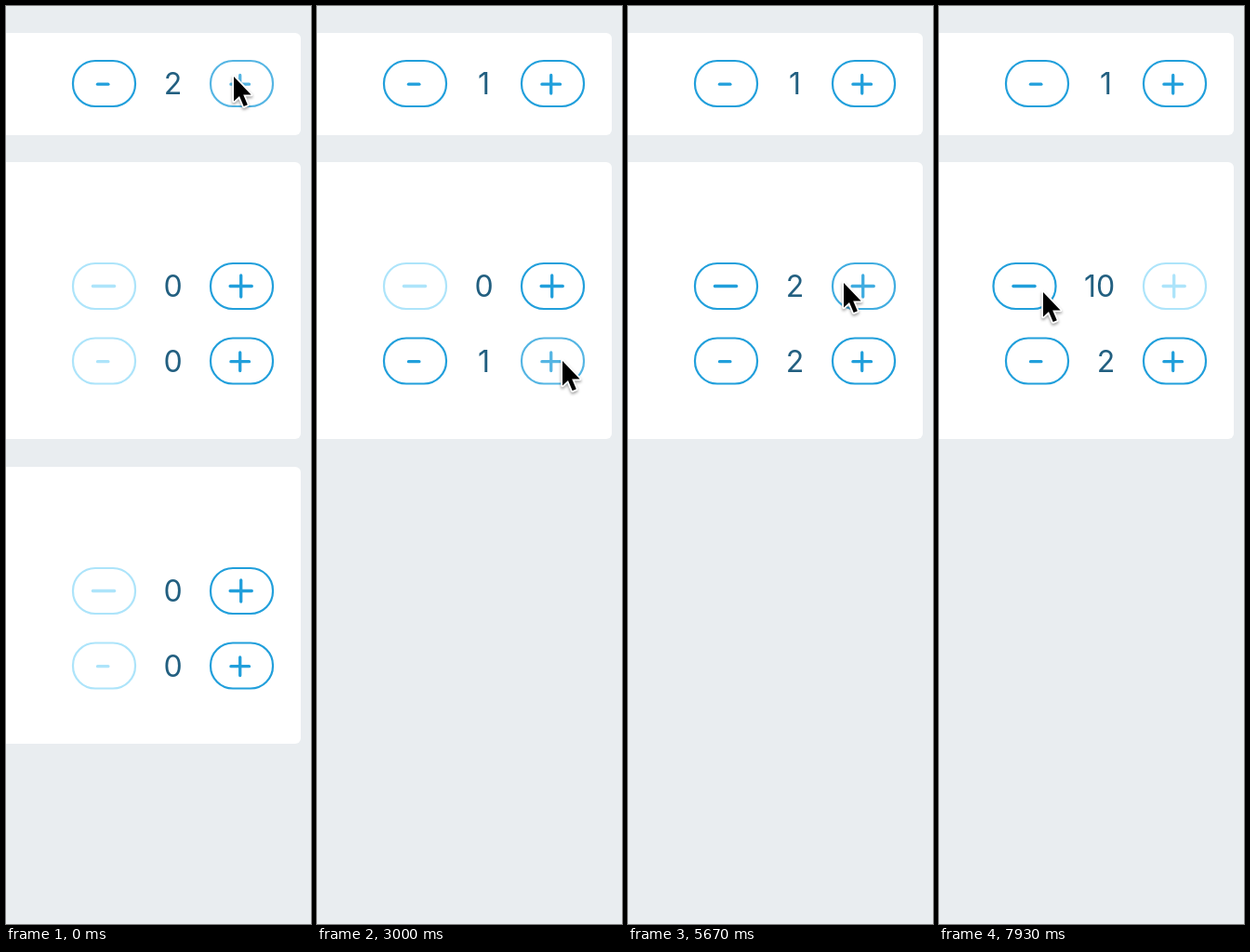
These frames come from a looping animation (328 by 988 pixels, 8000 ms). An HTML page:

```html
<!DOCTYPE html>
<html lang="en">
<head>
<meta charset="utf-8">
<title>Counters</title>
<style>
  html, body { margin: 0; width: 100%; height: 100%; overflow: hidden; background: #e9edf0; }
  svg { display: block; }
  text { font: 400 32px Inter, "Noto Sans", sans-serif; fill: #225f80; text-anchor: middle; }
  .btn { fill: none; stroke: #219fdb; }
  .btn.off { stroke: #ade4fa; }
  .btn rect { stroke-width: 2.2; }
  .btn path { stroke-width: 3.3; stroke-linecap: round; }
  #cursor path { stroke: #fff; stroke-width: 3.6; stroke-linejoin: round; paint-order: stroke; }
  #cursor { filter: drop-shadow(0 2px 1.5px rgba(0, 0, 0, .35)); }
</style>
</head>
<body>
<svg id="stage" width="328" height="988" viewBox="0 0 328 988">
  <g id="cards" fill="#fff"></g>
  <g id="cursor"><path d="M0 0V26.5L6 21L10.7 32L14.8 30.3L10.2 19.4H18.6Z"/></g>
</svg>
<script>
const LOOP = 8000, DOWN = 150, UP = 250, DIM = 0.2;
const NS = 'http://www.w3.org/2000/svg';
const $ = id => document.getElementById(id);

function add(parent, tag, attrs = {}) {
  const el = document.createElementNS(NS, tag);
  for (const k in attrs) el.setAttribute(k, attrs[k]);
  parent.appendChild(el);
  return el;
}

function makeButton(parent, x, y, d) {
  const g = add(parent, 'g', { class: 'btn' });
  add(g, 'rect', { x: x - 33.5, y: y - 24.5, width: 67, height: 49, rx: 24 });
  add(g, 'path', { d });
  return g;
}

function makeRow(parent, y, big) {
  const mx = big ? 105 : 104.2, px = big ? 252.7 : 251.7;
  const m = big ? 11.6 : 5.7, p = big ? 11.6 : 9.8;
  const gy = big ? y : y + 0.7;
  const minus = makeButton(parent, 105.5, y, `M${mx - m} ${gy}h${2 * m}`);
  const plus = makeButton(parent, 253.5, y,
    `M${px - p} ${gy}h${2 * p}M${px} ${gy - p}v${2 * p}`);
  const label = add(parent, 'text', { y: y + 11.7 });
  return { minus, plus, label };
}

function makeCard(top, height, rows) {
  const g = add($('cards'), 'g');
  add(g, 'rect', { x: -12, y: top, width: 329, height, rx: 6 });
  return { g, rows: rows.map(([dy, big]) => makeRow(g, top + dy, big)) };
}

const head = makeCard(29, 110, [[54.5, false]]);
const rooms = [168, 496, 824].map(top =>
  makeCard(top, 298, [[133.5, true], [214, false]]));
const rows = [head, ...rooms].flatMap(c => c.rows);

// Each click: row, step, press time, release time
const clicks = [
  [0, 1, -200, -120], [0, 1, 470, 640],
  [0, -1, 1000, 1265], [0, -1, 1670, 1860],
  [2, 1, 2800, 2880], [2, 1, 3130, 3210],
  [1, 1, 3990, 4070], [1, -1, 4710, 4810]
];
for (let i = 0; i < 10; i++) clicks.push([1, 1, 5490 + 130 * i, 5525 + 130 * i]);

// Pointer moves: start, end, x, y
const START = [245, 76];
const moves = [
  [690, 985, 108, 89], [2070, 2470, 262, 390], [2470, 2530, 264, 382],
  [3340, 3530, 262, 364], [3730, 3930, 262, 304], [4450, 4700, 98, 303],
  [5240, 5480, 232, 298], [7000, 7730, 129, 301], [7800, 7930, 112, 308]
];

const clamp = v => Math.max(0, Math.min(1, v));
const ease = p => p < 0.5 ? 2 * p * p : 1 - 2 * (1 - p) * (1 - p);

function pointer(t) {
  let [x, y] = START;
  for (const [a, b, tx, ty] of moves) {
    const k = ease(clamp((t - a) / (b - a)));
    x += (tx - x) * k;
    y += (ty - y) * k;
  }
  return [x, y];
}

// A press fades toward DIM, a release fades back; either may interrupt the other.
function opacity(row, step, t) {
  let v = 1;
  const fade = (from, until, goal, span) => {
    if (t > from) v += (goal - v) * ease(clamp((Math.min(t, until) - from) / span));
  };
  const own = clicks.filter(c => c[0] === row && c[1] === step);
  own.forEach(([, , press, release], i) => {
    fade(press, release, DIM, DOWN);
    fade(release, own[i + 1] ? own[i + 1][2] : Infinity, 1, UP);
  });
  return v;
}

function draw(t) {
  const counts = rows.map((_, i) => i ? 0 : 1);
  for (const [row, step, , release] of clicks) if (t >= release) counts[row] += step;
  rooms.forEach((c, i) => c.g.setAttribute('display', i < counts[0] ? 'inline' : 'none'));
  rows.forEach(({ minus, plus, label }, i) => {
    const n = counts[i], wide = n > 9;
    label.textContent = n;
    label.setAttribute('x', wide ? 172.7 : 179.5);
    minus.setAttribute('transform', `translate(${wide ? -13.5 : 0} 0)`);
    minus.classList.toggle('off', n === 0);
    plus.classList.toggle('off', wide);
    minus.setAttribute('opacity', opacity(i, -1, t));
    plus.setAttribute('opacity', opacity(i, 1, t));
  });
  $('cursor').setAttribute('transform', `translate(${pointer(t).join(' ')})`);
}

const t0 = performance.now();
function tick() {
  draw((performance.now() - t0) % LOOP);
  requestAnimationFrame(tick);
}
tick();
</script>
</body>
</html>
```
